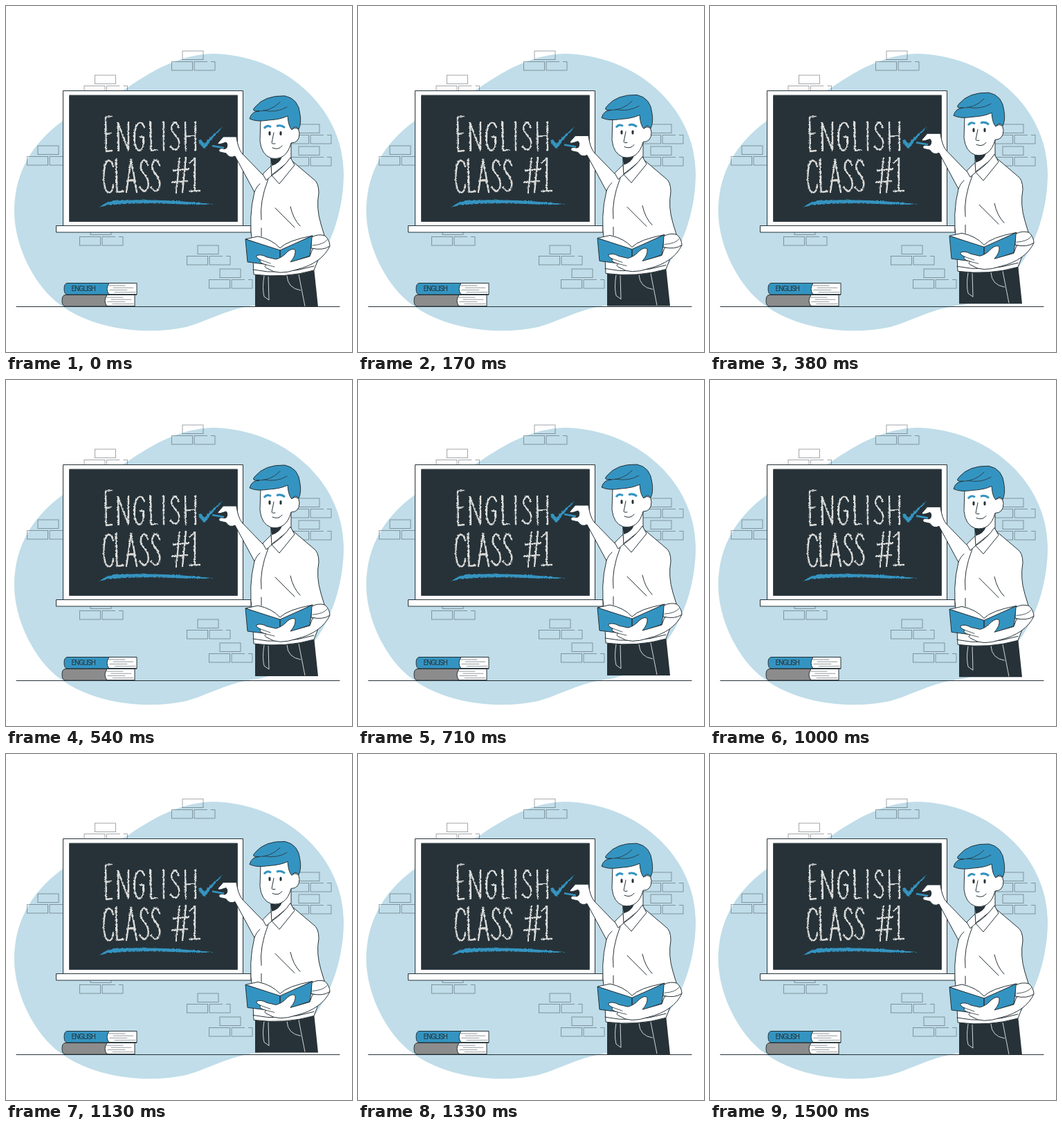
Recreate the animation shown at these times as an HTML page. Size 500x500 px, loop 1.54 s.

```html
<!DOCTYPE html>
<html lang="en">
<head>
<meta charset="utf-8">
<title>English class</title>
<style>
  html, body { margin: 0; height: 100%; overflow: hidden; background: #fff; }
  svg { display: block; width: 100vw; height: 100vh; }
  .line { fill: none; stroke: #263238; stroke-linecap: round; stroke-linejoin: round; }
  .thin { stroke-width: .8; }
  .white, .blue { fill: #fff; stroke: #263238; stroke-linejoin: round; }
  .blue { fill: #3494c1; }
  .dark { fill: #263238; }
  #bricks { fill: none; stroke: #263238; stroke-opacity: .48; stroke-width: .9; }
  #lettering { fill: none; stroke: #dcdcda; stroke-width: 2.4; stroke-linecap: round; stroke-linejoin: round; }
  #books text { font: 10px Roboto, sans-serif; letter-spacing: -.9px; }
</style>
</head>
<body>
<svg viewBox="0 0 500 500">
  <filter id="rough">
    <feTurbulence baseFrequency=".3" seed="4"/>
    <feDisplacementMap in="SourceGraphic" scale="2" xChannelSelector="R" yChannelSelector="G"/>
  </filter>
  <path fill="#c0dde9" d="M12 297C12 250 30 204 82 166C115 144 150 134 177 117C214 92 250 71 298 69C400 70 487 145 488 241C488 330 440 418 364 432C323 436 290 456 260 464C200 477 125 466 80 433C40 405 12 345 12 297Z"/>
  <g id="bricks"></g>

  <g id="board">
    <path class="white" d="M82.5 122.5H342.5V318H82.5Z"/>
    <path class="dark" stroke="#455056" d="M91.5 129H334.5V311.5H91.5Z"/>
    <path class="white" d="M72.5 317.5H354V327H72.5Z"/>
    <g id="lettering" filter="url(#rough)" role="img" aria-label="English class #1"></g>
    <g fill="#3494c1" filter="url(#rough)">
      <path d="M134 290Q143 281 164 280Q215 278 262 282L300 285.500Q270 287 241 285Q190 283 158 286Q143 287 134 290Z"/>
      <path d="M277 193L281 192L286 199Q297 184 313 174Q298 188 287 205Q281 203 277 193Z"/>
    </g>
  </g>
  <g id="books"></g>

  <g id="teacher">
    <path class="dark" d="M360 384L445 378L451 435H360Z"/>
    <path fill="none" stroke="#fff" stroke-width=".8" d="M373 390Q370 408 373 420L380 425L379 391M406 390Q407 408 426 411M423 388L432 434"/>

    <!-- raised arm and shirt -->
    <path class="white" d="M333 189Q335 205 341 213L371 244L385 232L411 222L444 250Q452 255 452 270Q448 292 455 315L462 338L445 382Q403 394 358 388L356 345Q350 305 359 269L331 217Q323 221 318 213L309 211Q306 208 310 206L317 206Q322 201 318 197L312 199Q304 201 307 197L314 189Z"/>
    <ellipse class="dark" cx="315.500" cy="202.500" rx="4.500" ry="4.500"/>
    <path stroke="#3494c1" stroke-width="2.600" d="M298 202L315 205"/>
    <path class="line" d="M359 269Q362 261 367 257M379 250Q366 283 369 309M369 321V333M389 292L417 320M411 290Q415 308 425 318M357 381Q398 390 445 376"/>

    <!-- neck and collar -->
    <path class="white" d="M383 217V245L412 222V198Z"/>
    <path class="dark" d="M382 219Q391 223 399 218Q395 228 384 231Z"/>
    <path class="white" d="M383 231L371 243L376 252L384 245ZM411 219L417 230L395 257L384 245Q401 234 411 219Z"/>

    <!-- head -->
    <path class="white" d="M368 163L367 195Q369 215 383 220Q405 224 412 198Q424 198 424 184Q423 173 413 178L407 157Z"/>
    <path class="blue" d="M352 163Q355 152 366 152Q353 153 360 146Q374 129 403 130Q423 134 425 157Q427 170 423 178Q418 171 413 179Q408 174 407 159Q397 164 380 165Q362 168 352 163Z"/>
    <path class="line thin" d="M363 152Q382 153 396 139M372 151Q391 155 406 146"/>
    <path fill="none" stroke="#3494c1" stroke-width="3" d="M373 177Q377 171 383 175M391 174Q397 171 403 176"/>
    <path class="line" stroke-width="3" d="M381 182.500V185.500M397 182.500V185.500"/>
    <path class="line" d="M387 183L384 198Q385 200 389 199M385 205Q394 209 399 202"/>

    <!-- open book, forearm and sleeve -->
    <path class="white" d="M346 337L364 333Q384 337 396 350Q406 339 443 332L396 354Z"/>
    <path class="blue" d="M346 337L396 353V376L349 370ZM396 353L443 332L439 361L396 376Z"/>
    <path class="white" d="M362 361Q368 358 377 363L390 366Q399 364 407 355Q415 349 418 353Q419 361 411 370L439 362L443 351L468 347Q456 372 420 381Q393 390 379 380Q371 377 376 374Q364 371 368 367Q361 364 362 361Z"/>
    <path class="line thin" d="M368 367L382 372M376 374L388 377"/>
    <path class="white" d="M442 334Q451 329 461 332Q468 339 468 347Q458 354 441 350Z"/>
    <path class="line thin" d="M443 346Q459 345 464 338"/>
  </g>
  <path class="line" d="M15 434.500H482"/>
</svg>
<script>
  const byId = id => document.getElementById(id);

  // One brick above two; the right one has a broken top edge.
  const brick = (x, y, dash = "none") =>
    `<rect x="${x}" y="${y}" width="30" height="12.5" stroke-dasharray="${dash}"/>`;
  const cluster = ([x, y]) =>
    brick(x, y) + brick(x - 15.5, y + 15.5) + brick(x + 17, y + 15.5, "19 5 200");
  byId("bricks").innerHTML = [
    [255, 65], [128.5, 100], [46, 202], [122, 318],
    [277, 346], [309, 380], [423, 171], [423, 203]
  ].map(cluster).join("");

  // Chalk letters: width and strokes in a cell 48 high.
  const glyphs = {
    E: [11, "M10 0L1 1L2 48L11 47M2 24L9 23"],
    N: [15, "M1 48L0 1L15 48V0"],
    G: [14, "M14 9Q11-3 5 2Q-1 10 0 30Q1 49 8 48Q14 45 13 25H8"],
    L: [10, "M0 0L1 48L10 47"],
    I: [1, "M0 0V48"],
    S: [12, "M12 9Q9-2 4 2Q-2 10 5 20Q14 29 12 40Q8 53 0 41"],
    H: [15, "M0 0L1 48M15 0V48M0 24L15 23"],
    C: [13, "M13 10Q9-3 3 4Q-2 15 0 36Q3 53 10 47Q13 44 13 37"],
    A: [15, "M0 48L7 0L15 48M3 31H13"],
    "#": [24, "M11 0L6 50M20 0L15 50M2 18L24 16M0 35L22 33"],
    1: [14, "M0 7L7 0V48M0 48L14 47"]
  };
  function write(text, x, y, height, gap) {
    for (const char of text) {
      const [width, strokes] = glyphs[char];
      byId("lettering").innerHTML +=
        `<path transform="translate(${x} ${y}) scale(1 ${height / 48})" d="${strokes}"/>`;
      x += width + gap;
    }
  }
  write("E", 142, 159, 50, 0);
  write("NGLISH", 161, 167, 41, 9);
  write("CLASS", 141, 221, 47, 4.5);
  write("#1", 239, 219, 48, 2);

  function book(x, y, width, color, title) {
    const spine = x + 61, end = x + width;
    let pages = "";
    for (let i = 0; i < 4; i++) {
      const left = spine + 3 + i * 7 % 12;
      pages += `M${left} ${y + 3.5 + i * 3.2}H${left + 24 + i * 5 % 9}`;
    }
    byId("books").innerHTML += `
      <path class="white" d="M${spine} ${y}H${end}V${y + 16.5}H${spine}Z"/>
      <path class="line" stroke-width=".5" d="${pages}"/>
      <path fill="${color}" stroke="#263238" d="M${end} ${y}H${x + 5}q-5 0-5 8.2t5 8.300H${end}H${spine + 4}q-6-8 0-16.500Z"/>
      <text class="dark" x="${x + 10.5}" y="${y + 11.8}">${title}</text>`;
  }
  book(81, 417.5, 105, "#8c8c8c", "");
  book(84, 400.5, 105, "#3494c1", "ENGLISH");

  const LOOP = 1540, LEAD = 50, RISE = 8;

  function draw(now) {
    const phase = 2 * Math.PI * (now + LEAD) / LOOP;
    const y = -RISE * (1 - Math.cos(phase)) / 2;
    byId("teacher").setAttribute("transform", `translate(0 ${y.toFixed(3)})`);
  }

  const start = performance.now();
  function tick() {
    draw(performance.now() - start);
    requestAnimationFrame(tick);
  }
  tick();
</script>
</body>
</html>
```
